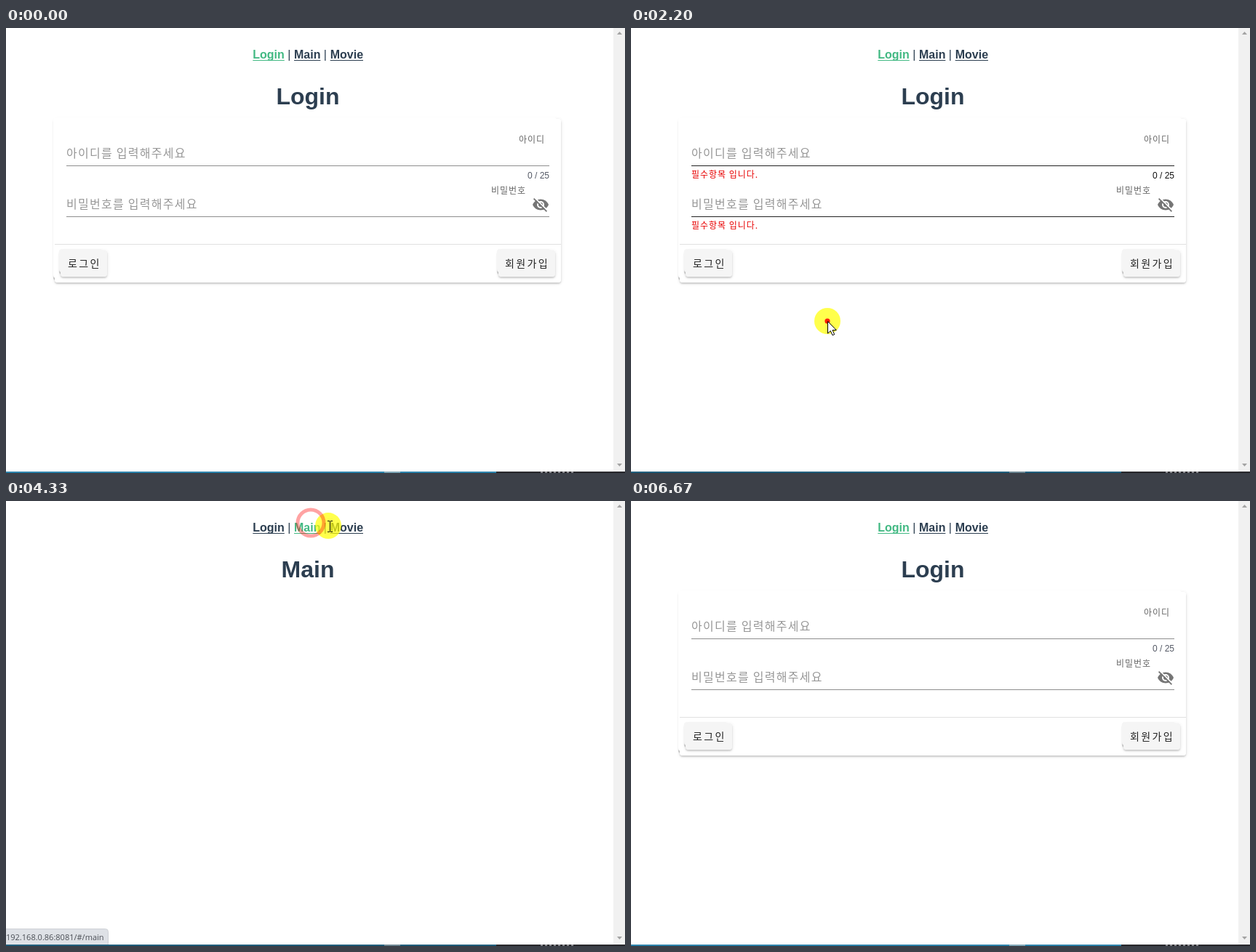
These frames come from a looping animation (851x612 px, 7410 ms). An HTML page with a canvas:

```html
<!DOCTYPE html>
<html lang="ko">
<head>
<meta charset="utf-8">
<title>Login</title>
<style>
html, body { margin: 0; width: 100%; height: 100%; overflow: hidden; background: #fff; }
canvas { display: block; }
</style>
</head>
<body>
<canvas id="stage" width="851" height="612"></canvas>
<script>
const ctx = document.getElementById('stage').getContext('2d');
const LOOP = 7410, STEP = 1000 / 15;
const SANS = '"Liberation Sans", Arial, sans-serif';
const KOREAN = '"Noto Sans CJK KR", "Noto Sans CJK", sans-serif';
const INK = '#2c3e50', GREEN = '#42b983';

// Pointer path: time, x, y
const PATH = [
  [130, 330, 650], [500, 319, 184], [900, 319, 184], [1250, 300, 312],
  [1500, 312, 242], [1680, 312, 242], [2130, 270, 403], [2330, 270, 403],
  [2867, 149, 324], [3030, 390, 254], [3200, 631, 291], [3340, 631, 291],
  [3720, 391, 18], [3930, 419, 30], [4200, 419, 30], [4333, 443, 34],
  [4500, 468, 36], [4860, 342, 38], [5100, 342, 38], [5250, 430, 36],
  [5400, 538, 20], [5500, 590, -40]
];
const CLICKS = [[515, 319, 184], [1540, 312, 242], [2150, 270, 403], [4000, 419, 30], [4934, 342, 38]];
const LINKS = [['Login', 339.3, 43.5], ['Main', 396, 36.4], ['Movie', 445.7, 45.3]];
const HINTS = [[4060, 'main'], [4530, 'movie'], [4930, 'login'], [5200, 'main'], [5460, 'movie']];
const FIELDS = [
  { y: 189, hint: '아이디를 입력해주세요', label: '아이디', labelX: 705, focus: 690, blur: 1720, from: 319 },
  { y: 259, hint: '비밀번호를 입력해주세요', label: '비밀번호', labelX: 667, focus: 1720, blur: 2200, from: 312 }
];
const MAIN_FROM = 4120, MAIN_TO = 5060;

const clamp = v => Math.max(0, Math.min(1, v));
const mix = (a, b, p) => a + (b - a) * p;

function rect(x, y, w, h, color) {
  ctx.fillStyle = color;
  ctx.fillRect(x, y, w, h);
}

function text(str, x, y, font, color, spacing = 0, align = 'left') {
  ctx.font = font;
  ctx.fillStyle = color;
  ctx.textAlign = align;
  ctx.letterSpacing = spacing + 'px';
  ctx.fillText(str, x, y);
  ctx.letterSpacing = '0px';
}

const korean = (str, x, y, size, color, spacing = size * 0.08, weight = 400) =>
  text(str, x, y, `${weight} ${size}px ${KOREAN}`, color, spacing);

function polygon(points, x, y) {
  ctx.beginPath();
  points.forEach(([px, py]) => ctx.lineTo(x + px, y + py));
  ctx.closePath();
}

function disc(x, y, r, color) {
  ctx.fillStyle = color;
  ctx.beginPath();
  ctx.arc(x, y, r, 0, Math.PI * 2);
  ctx.fill();
}

function raised(x, y, w, h, color) {
  ctx.save();
  ctx.fillStyle = color;
  // offset, blur, spread, alpha
  for (const [dy, blur, spread, a] of [[1, 5, 0, 0.12], [2, 2, 0, 0.14], [3, 1, -2, 0.2]]) {
    ctx.shadowColor = `rgba(0,0,0,${a})`;
    ctx.shadowOffsetY = dy;
    ctx.shadowBlur = blur;
    ctx.beginPath();
    ctx.roundRect(x - spread * -1, y - spread * -1 * -1 * -1, w + spread * 2, h + spread * 2, 4);
    ctx.fill();
  }
  ctx.shadowColor = 'transparent';
  ctx.beginPath();
  ctx.roundRect(x, y, w, h, 4);
  ctx.fill();
  ctx.restore();
}

// Monotone cubic through the path points
function pointerAt(t) {
  const last = PATH.length - 1;
  if (t < PATH[0][0] || t >= PATH[last][0]) return null;
  let i = 0;
  while (t >= PATH[i + 1][0]) i++;
  const rate = (k, c) => k < 0 || k >= last ? 0 : (PATH[k + 1][c] - PATH[k][c]) / (PATH[k + 1][0] - PATH[k][0]);
  const slope = (k, c) => {
    const a = rate(k - 1, c), b = rate(k, c);
    return a * b <= 0 ? 0 : 2 * a * b / (a + b);
  };
  const span = PATH[i + 1][0] - PATH[i][0], u = (t - PATH[i][0]) / span;
  const at = c => {
    const ease = u * u * (3 - 2 * u);
    return mix(PATH[i][c], PATH[i + 1][c], ease)
      + span * (u * (1 - u) ** 2 * slope(i, c) - u * u * (1 - u) * slope(i + 1, c));
  };
  return { x: at(1), y: at(2) };
}

const within = (p, x, y, w, h) => p && p.x >= x && p.x < x + w && p.y >= y && p.y < y + h;
const overField = (p, f) => within(p, 83, f.y - 32, 664, 34);

function drawNav(onMain) {
  const title = onMain ? 'Main' : 'Login';
  for (const [name, x, w] of LINKS) {
    const color = name === title ? GREEN : INK;
    text(name, x, 42, `bold 16px ${SANS}`, color);
    rect(x, 44, w, 1, color);
  }
  for (const x of [387.3, 436.8]) text('|', x, 42, `16px ${SANS}`, INK);
  text(title, 415, 105, `bold 32px ${SANS}`, INK, 0, 'center');
}

function drawEye(x, y) {
  const grey = '#757575';
  ctx.save();
  ctx.translate(x, y);
  ctx.fillStyle = grey;
  ctx.fill(new Path2D('M1 12C2.7 7.6 7 4.5 12 4.5S21.3 7.6 23 12C21.3 16.4 17 19.5 12 19.5S2.7 16.4 1 12Z'));
  disc(12, 12, 5, '#fff');
  disc(12, 12, 3, grey);
  for (const [shift, color] of [[1.2, '#fff'], [0, grey]]) {
    ctx.strokeStyle = color;
    ctx.lineWidth = 1.8;
    ctx.beginPath();
    ctx.moveTo(2.6 + shift, 3.6 - shift);
    ctx.lineTo(20.4 + shift, 21.4 - shift);
    ctx.stroke();
  }
  ctx.restore();
}

function drawField(f, t, p) {
  const fresh = t >= MAIN_TO;
  const focused = t >= f.focus && t < f.blur;
  const failed = t >= f.blur && !fresh;
  korean(f.hint, 83, f.y - 11, 16, '#979797', 1.28, 300);
  korean(f.label, f.labelX, f.y - 31, 12, '#666', 0.96, 300);
  rect(83, f.y, 664, 1, failed || overField(p, f) ? '#222' : '#8e8e8e');
  if (focused) {
    const grow = clamp((t - f.focus) / 180);
    const left = mix(f.from, 83, grow);
    rect(left, f.y - 1, mix(f.from, 747, grow) - left, 2, '#000');
    if ((t - f.focus) % 1000 < 500) rect(83, f.y - 26, 1, 18, '#222');
  }
  if (failed) korean('필수항목 입니다.', 83, f.y + 17, 12, '#e80000');
  return failed;
}

function drawForm(t, p) {
  raised(67, 125, 696, 225, '#fff');
  const [failed] = FIELDS.map(f => drawField(f, t, p));
  text('0 / 25', 747, 207, `12px ${SANS}`, failed ? '#111' : '#555a66', 0, 'right');
  drawEye(723, 231);
  rect(67, 297, 696, 1, '#e0e0e0');
  raised(75, 306, 64, 36, '#f5f5f5');
  raised(677, 306, 78, 36, '#f5f5f5');
  korean('로그인', 85, 329, 14, '#212121', 2.37);
  korean('회원가입', 686, 329, 14, '#212121', 2.37);
}

function drawStatus(t) {
  const alpha = clamp((t - 4000) / 130) * clamp(1 - (t - 5600) / 267);
  const hint = HINTS.filter(h => t >= h[0]).pop();
  if (!hint || alpha <= 0) return;
  const str = '192.168.0.86:8081/#/' + hint[1];
  ctx.save();
  ctx.globalAlpha = alpha;
  ctx.font = '11px "Open Sans", "Noto Sans", sans-serif';
  const w = Math.round(ctx.measureText(str).width) + 6;
  ctx.fillStyle = '#dee1e6';
  ctx.strokeStyle = '#ced1d6';
  ctx.lineWidth = 1;
  ctx.beginPath();
  ctx.roundRect(-1, 588.5, w + 0.5, 23, [0, 4, 0, 0]);
  ctx.fill();
  ctx.stroke();
  text(str, 0, 604, ctx.font, '#4a4e55');
  ctx.restore();
}

function drawFrame(t) {
  rect(835, 0, 16, 610, '#f1f1f1');
  ctx.fillStyle = '#a3a3a3';
  for (const [y, dir] of [[9, -1], [599, 1]]) {
    polygon([[-3.5, 0], [3.5, 0], [0, 4 * dir]], 843.5, y);
    ctx.fill();
  }
  const active = t < 130 || t >= 6660;
  rect(0, 610, 674, 2, active ? '#2d83ab' : '#225f7c');
  rect(520, 610, 22, 2, active ? '#7fa6b5' : '#6b8490');
  rect(674, 610, 177, 2, '#2a2a2e');
  for (let x = 735; x < 782; x += 6) rect(x, 610, 3, 2, '#85858a');
}

function drawArrow(x, y) {
  polygon([[0, 0], [0, 16.5], [3.8, 13], [6.5, 19], [9.2, 18], [6.6, 12], [11.8, 12]], x, y);
  ctx.fillStyle = '#fff';
  ctx.strokeStyle = '#000';
  ctx.lineWidth = 1;
  ctx.fill();
  ctx.stroke();
}

function drawBeam(x, y) {
  x = Math.round(x);
  y = Math.round(y);
  rect(x, y - 7, 1, 14, '#000');
  for (const dy of [-8, 7]) {
    rect(x - 3, y + dy, 3, 1, '#000');
    rect(x + 1, y + dy, 3, 1, '#000');
  }
}

function drawHand(x, y) {
  ctx.save();
  ctx.translate(x - 6, y);
  const hand = new Path2D('M5 12V2Q6.5 0 8 2V8Q12 7 16 10V15L14 21H6L1 14Q1 11 3 11Z');
  ctx.fillStyle = '#fff';
  ctx.strokeStyle = '#000';
  ctx.lineWidth = 1;
  ctx.fill(hand);
  ctx.stroke(hand);
  ctx.restore();
}

function drawPointer(t, p, onMain) {
  if (p) disc(p.x, p.y, 18, 'rgba(255,255,0,0.7)');
  for (const [start, x, y] of CLICKS) {
    const u = (t - start) / 650;
    if (u <= 0 || u >= 1) continue;
    const outer = 30 * (1 - (1 - u) ** 1.6), width = Math.min(5, outer);
    ctx.strokeStyle = `rgba(255,0,0,${1 - outer / 32})`;
    ctx.lineWidth = width;
    ctx.beginPath();
    ctx.arc(x, y, outer - width / 2, 0, Math.PI * 2);
    ctx.stroke();
  }
  if (!p) return;
  const overLink = LINKS.some(([, x, w]) => within(p, x, 27, w, 19));
  const overButton = !onMain && (within(p, 75, 306, 64, 36) || within(p, 677, 306, 78, 36));
  const overText = within(p, 339, 27, 152, 19) || (!onMain && FIELDS.some(f => overField(p, f)));
  if (overLink || overButton) drawHand(p.x, p.y);
  else if (overText) drawBeam(p.x + 2, p.y + 1);
  else drawArrow(p.x + 0.5, p.y + 0.5);
}

function render(t) {
  const onMain = t >= MAIN_FROM && t < MAIN_TO;
  const p = pointerAt(t);
  rect(0, 0, 851, 612, '#fff');
  drawNav(onMain);
  if (!onMain) drawForm(t, p);
  drawStatus(t);
  drawPointer(t, p, onMain);
  drawFrame(t);
}

const begin = performance.now();
function tick() {
  const t = (performance.now() - begin) % LOOP;
  render(Math.floor((t + 4) / STEP) * STEP);
  requestAnimationFrame(tick);
}
tick();
</script>
</body>
</html>
```
